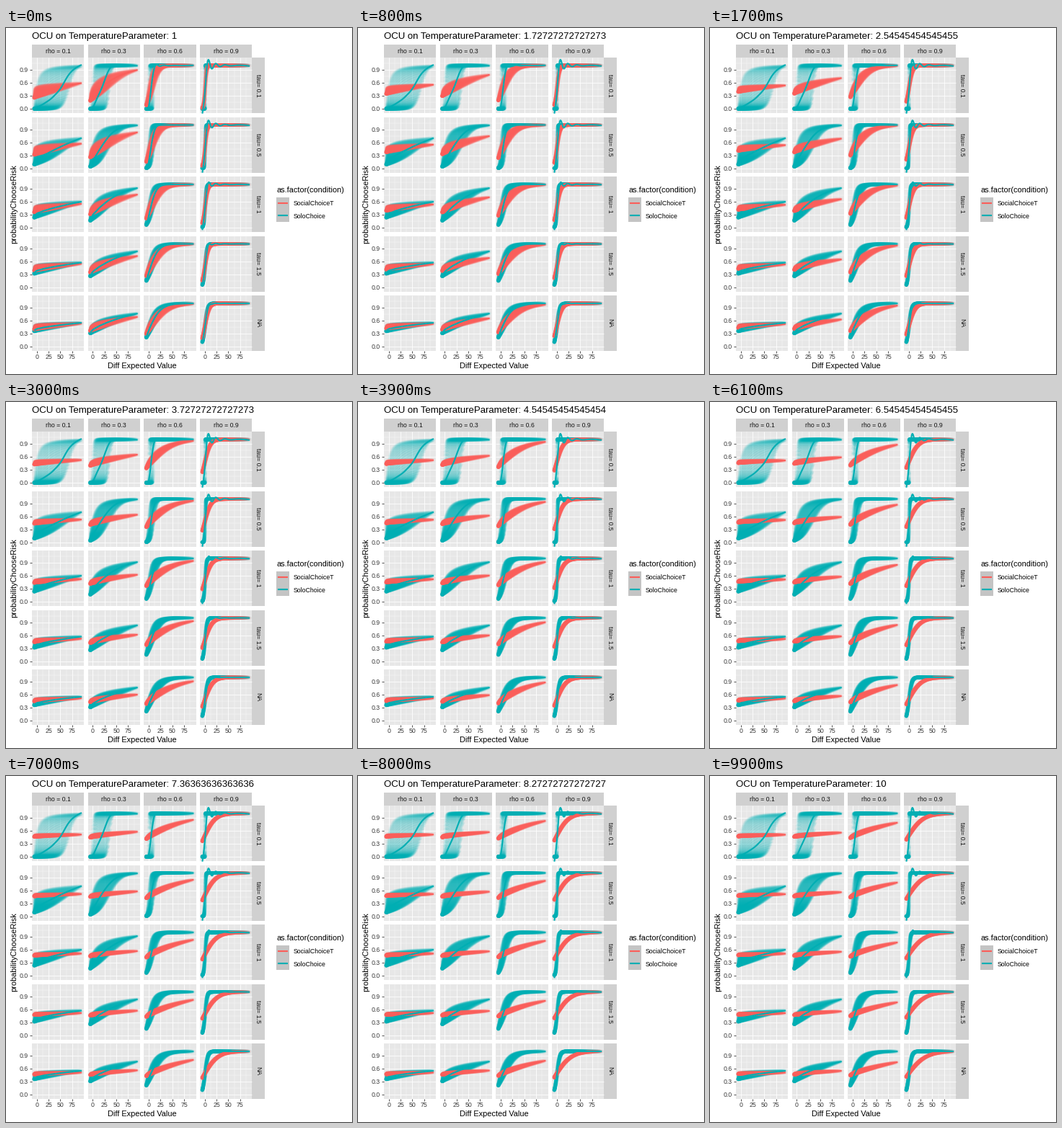
These frames come from a looping animation (480x480 px, 10000 ms). A matplotlib script:

```python
import numpy as np
import matplotlib.pyplot as plt
from matplotlib.animation import FuncAnimation
from matplotlib.collections import LineCollection
from matplotlib.patches import Rectangle

SIZE, FRAMES = 480, 100
RED, TEAL = (250, 94, 90), (0, 174, 179)
RHOS = [0.1, 0.3, 0.6, 0.9]
TAUS = [0.1, 0.5, 1, 1.5, 2]
TAU_LABELS = ["tau= 0.1", "tau= 0.5", "tau= 1", "tau= 1.5", "NA"]
LEFT, TOP, W, H = 36, 41, 72.2, 77
DX, DY = 77.7, 82.5
ALPHA, RADIUS = 0.05, 2.2
SAFE = 5

plt.rcParams["font.family"] = "Liberation Sans"
fig = plt.figure(figsize=(SIZE / 72, SIZE / 72), dpi=72, facecolor="white")
ax = fig.add_axes([0, 0, 1, 1])
ax.axis("off")


def to_x(v, col=0):
    return LEFT + DX * col + (v + 10) * W / 110


def to_y(v, row=0):
    return TOP + DY * row + 71 - 60 * v


def rgb(c):
    return tuple(v / 255 for v in c)


def rect(x, y, w, h, color):
    ax.add_patch(Rectangle((x, y), w, h, fc=color, ec="none", zorder=0))


def text(x, y, s, size=8.8, color="black", **kw):
    return ax.text(x, y, s, fontsize=size, color=color, zorder=6, **kw)


def segments(segs, color, width, z):
    ax.add_collection(LineCollection(segs, colors=color, linewidths=width, zorder=z))


# Gambles: win probability x prize, against a safe amount
prob, prize = np.meshgrid(np.linspace(0, 1, 51), np.arange(1, 101))
prob, prize = prob.ravel(), prize.ravel()
diff_ev = prob * prize - SAFE
gain = np.array([prob * prize**r - SAFE**r for r in RHOS])
grid = np.linspace(-SAFE, 95, 80)


def choice(temps):
    """Probability of the gamble, indexed by row, column, gamble."""
    return 1 / (1 + np.exp(-gain[None] / np.asarray(temps)[:, None, None]))


def spline_basis(x, knots):
    """Natural cubic spline basis."""
    last = knots[-1]

    def d(k):
        a = np.clip(x - k, 0, None) ** 3 - np.clip(x - last, 0, None) ** 3
        return a / (last - k)

    tail = d(knots[-2])
    return np.stack([np.ones_like(x), x] + [d(k) - tail for k in knots[:-2]], 1)


knots = np.quantile(np.unique(diff_ev.round(6)), np.linspace(0, 1, 10))
basis = spline_basis(diff_ev / 100, knots / 100)
smoother = spline_basis(grid / 100, knots / 100) @ np.linalg.pinv(basis)

# Antialiased dot, centred on the origin for the convolution
off = np.fft.fftfreq(SIZE, 1 / SIZE)
dot = np.clip(RADIUS + 0.5 - np.hypot(off[:, None], off[None]), 0, 1)
dot_fft = np.fft.rfft2(dot)

shape = (len(TAUS), len(RHOS), len(prob))
cols = np.arange(len(RHOS))[None, :, None]
rows = np.arange(len(TAUS))[:, None, None]
dot_x = np.broadcast_to(to_x(diff_ev, cols), shape).ravel() - 0.5
ix = dot_x.astype(int)
fx = dot_x - ix


def cloud(p, color):
    """RGBA image of all translucent dots."""
    y = to_y(p, rows).ravel() - 0.5
    iy = y.astype(int)
    fy = y - iy
    base = iy * SIZE + ix
    hits = np.zeros(SIZE * SIZE)
    for step, wt in ((0, (1 - fx) * (1 - fy)), (1, fx * (1 - fy)),
                     (SIZE, (1 - fx) * fy), (SIZE + 1, fx * fy)):
        hits += np.bincount(base + step, wt, SIZE * SIZE)
    layers = np.fft.irfft2(np.fft.rfft2(hits.reshape(SIZE, SIZE)) * dot_fft, (SIZE, SIZE))
    img = np.empty((SIZE, SIZE, 4), np.uint8)
    img[..., :3] = color
    img[..., 3] = np.round(255 * (1 - (1 - ALPHA) ** np.clip(layers, 0, None)))
    return img


def curves(p):
    fit = p @ smoother.T
    return [np.column_stack([to_x(grid, c), to_y(fit[r, c], r)])
            for r in range(len(TAUS)) for c in range(len(RHOS))]


def draw_panels():
    major, minor, ticks = [], [], []
    for r in range(len(TAUS)):
        for c in range(len(RHOS)):
            x0, y0 = LEFT + DX * c, TOP + DY * r
            rect(x0, y0, W, H, "#E7E7E7")
            for segs, xs, ys in ((major, (0, 25, 50, 75), (0, 0.3, 0.6, 0.9)),
                                 (minor, (12.5, 37.5, 62.5, 87.5), (0.15, 0.45, 0.75, 1.05))):
                segs += [[(to_x(v, c), y0), (to_x(v, c), y0 + H)] for v in xs]
                segs += [[(x0, to_y(v, r)), (x0 + W, to_y(v, r))] for v in ys]
    bottom = TOP + DY * 4 + H
    for c, rho in enumerate(RHOS):
        x0 = LEFT + DX * c
        rect(x0, 23.2, W, TOP - 23.2, "#D0D0D0")
        text(x0 + W / 2, 35, f"rho = {rho}", color="#161616", ha="center")
        for v in (0, 25, 50, 75):
            x = to_x(v, c)
            ticks.append([(x, bottom), (x, bottom + 2.75)])
            text(x, bottom + 11.2, str(v), color="#3B3B3B", ha="center")
    right = LEFT + DX * 3 + W
    for r, label in enumerate(TAU_LABELS):
        y0 = TOP + DY * r
        rect(right, y0, 17.6, H, "#D0D0D0")
        text(right + 8.3, y0 + H / 2, label, color="#161616", rotation=270,
             ha="center", va="center")
        for v in (0, 0.3, 0.6, 0.9):
            y = to_y(v, r)
            ticks.append([(LEFT - 2.75, y), (LEFT, y)])
            text(LEFT - 5, y + 3.2, f"{v:.1f}", color="#3B3B3B", ha="right")
    segments(minor, "white", 0.4, 1)
    segments(major, "white", 0.8, 1)
    segments(ticks, "#242424", 0.8, 1)


def draw_legend():
    text(375.5, 228, "as.factor(condition)", 11)
    for i, (name, color) in enumerate((("SocialChoiceT", RED), ("SoloChoice", TEAL))):
        y = 234.5 + 17.28 * i
        rect(375.3, y, 17.28, 17.28, "#C4C4C4")
        segments([[(377, y + 8.64), (390.9, y + 8.64)]], [rgb(color)], 2.13, 5)
        text(398.2, y + 11.9, name)


draw_panels()
draw_legend()
text(189, 471.5, "Diff Expected Value", 11, ha="center")
text(11, 244.5, "probabilityChooseRisk", 11, rotation=90, ha="center", va="center")
title = text(36, 15, "", 13.2)

solo = choice(TAUS)
view = dict(extent=(0, SIZE, SIZE, 0), interpolation="nearest", aspect="auto")
ax.imshow(cloud(solo, TEAL), zorder=2, **view)
social_dots = ax.imshow(np.zeros((SIZE, SIZE, 4), np.uint8), zorder=3, **view)
social_lines = LineCollection([], colors=[rgb(RED)], linewidths=2.13, zorder=4)
ax.add_collection(social_lines)
segments(curves(solo), [rgb(TEAL)], 2.13, 5)
ax.set_xlim(0, SIZE)
ax.set_ylim(SIZE, 0)


def update(i):
    temp = 1 + i * (9 / 99)
    social = choice([tau + temp for tau in TAUS])
    social_dots.set_data(cloud(social, RED))
    social_lines.set_segments(curves(social))
    title.set_text(f"OCU on TemperatureParameter: {temp:.15g}")
    return social_dots, social_lines, title


anim = FuncAnimation(fig, update, frames=FRAMES, interval=100, repeat=True, repeat_delay=0)
plt.show()
```
